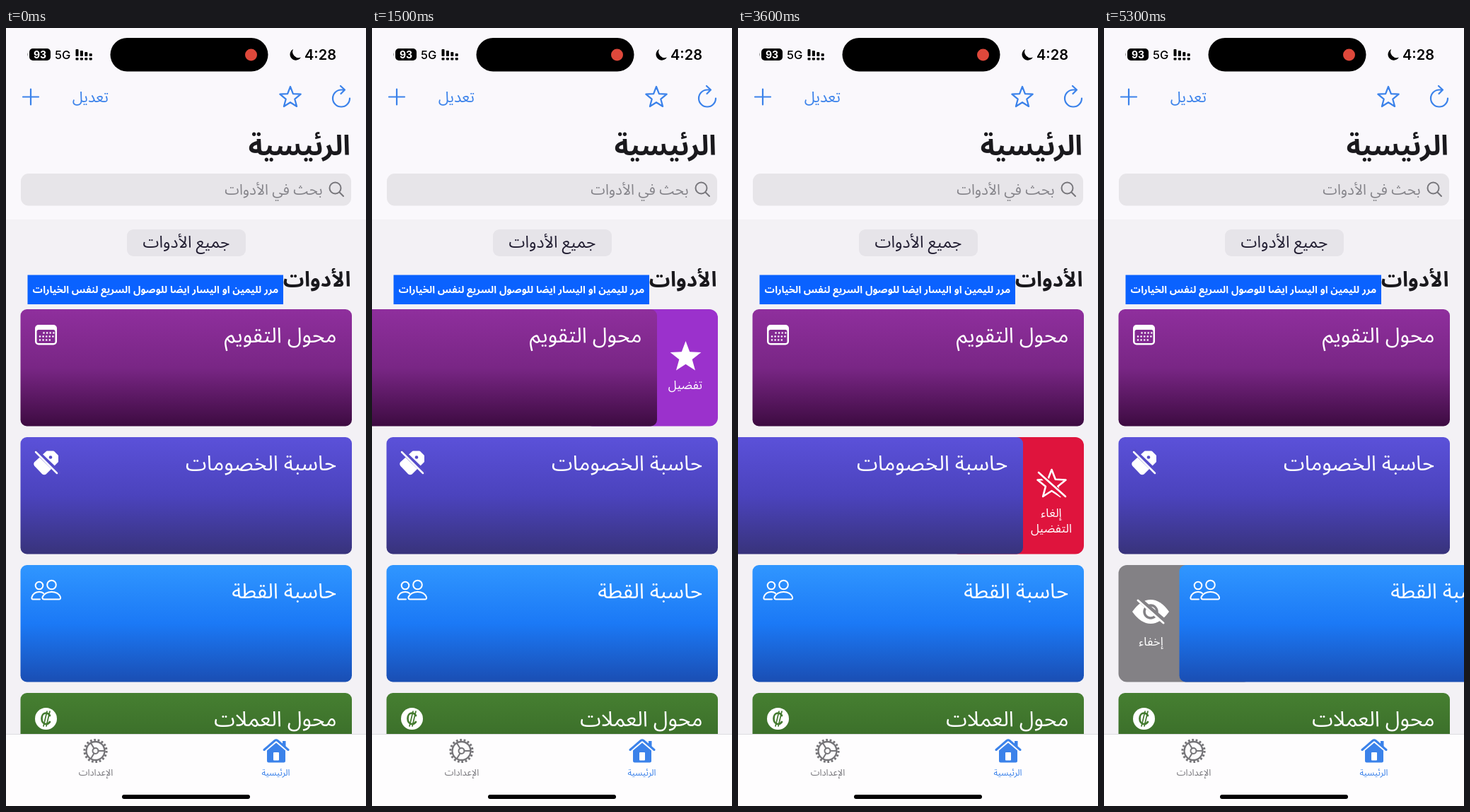
Write an HTML page that moves like this. It is 509 by 1101 pixels and loops after 5.4 s.

```html
<!DOCTYPE html>
<html lang="ar">
<head>
<meta charset="utf-8">
<title>الأدوات</title>
<style>
  html, body { margin: 0; width: 100%; height: 100%; overflow: hidden; background: #f3f1f5; }
  svg { display: block; width: 509px; height: 1101px; }
  text { font-family: "Noto Sans Arabic", "Noto Sans", "DejaVu Sans", sans-serif; direction: rtl; }
  .ltr { font-family: Inter, Roboto, sans-serif; direction: ltr; }
  .mid { text-anchor: middle; }
  .title { font-size: 30px; fill: #fff; }
  .label { font-size: 17px; fill: #fff; text-anchor: middle; }
  .line { fill: none; stroke-linecap: round; stroke-linejoin: round; }
</style>
</head>
<body>
<svg viewBox="0 0 509 1101">
  <defs id="defs"></defs>
  <rect width="509" height="271" fill="#faf8fc"/>

  <!-- status bar -->
  <rect x="33" y="29" width="30" height="17" rx="5"/>
  <path d="M31 35q-2 2.500 0 5z" fill="#999"/>
  <text class="ltr mid" x="48" y="43" font-size="14" font-weight="700" fill="#fff">93</text>
  <text class="ltr" x="69" y="44" font-size="16.500" font-weight="500">5G</text>
  <g id="signal"></g>
  <rect x="147.500" y="14" width="223" height="47.500" rx="23.700"/>
  <circle cx="346.500" cy="38" r="8.500" fill="#de483b"/>
  <path d="M406 30a8.300 8.300 0 1 0 11 11.500a8.600 8.600 0 0 1 -11 -11.500z"/>
  <text class="ltr" x="422" y="45" font-size="20" font-weight="600">4:28</text>

  <!-- toolbar -->
  <g class="line" stroke="#3b82ea" stroke-width="2.200">
    <path d="M24 97.500H46M35 86.500V108.500"/>
    <path id="starOutline"/>
    <path d="M478 87.500H474A12 12 0 1 0 486 99.500M473 82l6 5.500l-5.500 5.500"/>
  </g>
  <text x="145" y="105" font-size="21.500" fill="#3b82ea">تعديل</text>
  <text x="487" y="180" font-size="39" font-weight="700" fill="#1a191d">الرئيسية</text>
  <rect x="21" y="206" width="467" height="45.500" rx="11" fill="#e7e5e9"/>
  <path class="line" d="M457.500 226.500a8 8 0 1 0 16 0a8 8 0 1 0 -16 0M471.500 232.500l5.500 5.500" stroke="#77767b" stroke-width="2"/>
  <text x="447.500" y="236" font-size="20.700" fill="#85848a">بحث في الأدوات</text>

  <!-- list heading -->
  <rect x="171" y="285" width="168" height="38" rx="9" fill="#e6e4e9"/>
  <text class="mid" x="255" y="311" font-size="23.200" fill="#211d31">جميع الأدوات</text>
  <text x="487.500" y="366" font-size="29.500" font-weight="600" fill="#19181c">الأدوات</text>
  <rect x="30.500" y="349.500" width="361.500" height="41.500" fill="#0a62ff"/>
  <text class="mid" x="211.500" y="375" font-size="14.200" font-weight="700" fill="#fff">مرر لليمين او اليسار ايضا للوصول السريع لنفس الخيارات</text>

  <!-- swipe actions -->
  <g id="action0">
    <rect x="300" y="398" width="189" height="165.500" rx="12" fill="#9b31cc"/>
    <path id="starFull" fill="#fff"/>
    <text class="label" x="443" y="511">تفضيل</text>
  </g>
  <g id="action1">
    <rect x="300" y="579" width="189" height="165.500" rx="12" fill="#df143d"/>
    <g class="line" stroke="#fff" stroke-width="2.600">
      <path id="starOff"/>
      <path d="M426 630L462 664" stroke="#df143d" stroke-width="7"/>
      <path d="M425 629L463 663"/>
    </g>
    <text class="label" x="443" y="692">إلغاء</text>
    <text class="label" x="443" y="714">التفضيل</text>
  </g>
  <g id="action2">
    <rect x="20.500" y="760" width="189" height="165.500" rx="12" fill="#838185"/>
    <path d="M40 826Q52 809 66 809T92 826Q80 843 66 843T40 826z" fill="#fff"/>
    <circle class="line" cx="66" cy="826" r="9" stroke="#838185" stroke-width="3.500"/>
    <path class="line" d="M50 809L87 841" stroke="#838185" stroke-width="7"/>
    <path class="line" d="M48 810L84 842" stroke="#fff" stroke-width="3"/>
    <text class="label" x="66.500" y="874">إخفاء</text>
  </g>

  <!-- cards -->
  <g id="card0">
    <rect x="20.500" y="398" width="468.500" height="165.500" rx="9" fill="url(#g0)"/>
    <text class="title" x="467.500" y="445">محول التقويم</text>
    <rect x="41" y="420" width="31" height="28.500" rx="5" fill="#fff"/>
    <rect x="43.500" y="427" width="26" height="19" rx="2.500" fill="#832a92"/>
    <path class="line" d="M53.500 431.500h14M48 436.500h20M48 441.500h14" stroke="#fff" stroke-width="2.600" stroke-dasharray="0 4.600"/>
  </g>
  <g id="card1">
    <rect x="20.500" y="579" width="468.500" height="165.500" rx="9" fill="url(#g1)"/>
    <text class="title" x="467.500" y="626">حاسبة الخصومات</text>
    <path class="line" d="M58 600h9l5.500 5.500v8L56 630q-2 1.500-4 0L41.500 619q-1.500-2 0-4z" stroke="#fff" stroke-width="3" style="fill:#fff"/>
    <circle cx="63" cy="607.500" r="2.300" fill="#554cca"/>
    <path class="line" d="M43 599L74 629" stroke="#554cca" stroke-width="6.500"/>
    <path class="line" d="M42 600L72 630" stroke="#fff" stroke-width="2.500"/>
  </g>
  <g id="card2">
    <rect x="20.500" y="760" width="468.500" height="165.500" rx="9" fill="url(#g2)"/>
    <text class="title" x="467.500" y="807">حاسبة القطة</text>
    <g class="line" stroke="#fff" stroke-width="2">
      <circle cx="47" cy="789" r="5.300"/>
      <circle cx="64.500" cy="788" r="6.300"/>
      <path d="M48 808.500H38q-2 0-1.500-3Q39 798 47 798q4 0 6 2"/>
      <path d="M54 808.500H75q2.500 0 2-3Q74 798 64.500 798T51.500 805.500q-.5 3 2.500 3z"/>
    </g>
  </g>
  <g>
    <rect x="20.500" y="941" width="468.500" height="165.500" rx="9" fill="url(#g3)"/>
    <text class="title" x="467.500" y="988">محول العملات</text>
    <circle cx="56.500" cy="977.500" r="15.500" fill="#fff"/>
    <path class="line" d="M62 973q-2-3.500-5.500-3.500c-8 0-8 15.500 0 15.500q3.500 0 5.500-3" stroke="#437a2f" stroke-width="2.700"/>
    <path class="line" d="M58 967l-5 21M62 967l-5 21" stroke="#437a2f" stroke-width="1.700"/>
  </g>

  <!-- tab bar -->
  <rect y="999" width="509" height="102" fill="#fefdfe"/>
  <rect y="999" width="509" height="1" fill="#dddce0"/>
  <g class="line" stroke="#757478">
    <circle cx="126.500" cy="1023" r="13" stroke-width="2.300"/>
    <circle cx="126.500" cy="1023" r="15.500" stroke-width="3.200" stroke-dasharray="2.700 2.710" stroke-linecap="butt"/>
    <circle cx="126.500" cy="1023" r="4" stroke-width="2"/>
    <path d="M130.500 1023H139M124.500 1019.500L120 1012M124.500 1026.500L120 1034" stroke-width="2"/>
  </g>
  <g fill="#3b82ea">
    <path class="line" d="M365 1021.500L380 1008.500q2-1.500 4 0L399 1021.500" stroke="#3b82ea" stroke-width="3"/>
    <path d="M391 1009h4.500v9l-4.500-4z"/>
    <path d="M369 1022.500L382 1011.500L395 1022.500V1037q0 2.500-2.500 2.500h-21q-2.500 0-2.500-2.500z"/>
    <rect x="378" y="1025" width="8" height="11.500" rx="1" fill="#fff"/>
  </g>
  <text class="mid" x="127" y="1058" font-size="12.800" fill="#77767b">الإعدادات</text>
  <text class="mid" x="381.500" y="1058" font-size="12.500" fill="#3b82ea">الرئيسية</text>
  <rect x="164" y="1085" width="181" height="6" rx="3"/>
</svg>
<script>
const el = id => document.getElementById(id);

const shades = [
  ['#8f2f9d', '#792685', '#3d0b41'],
  ['#5b51d9', '#4b43bd', '#38337b'],
  ['#3096ff', '#1b79f6', '#1a4eb3'],
  ['#467f31', '#386a28', '#1e3c14']
];
el('defs').innerHTML = shades.map((colors, i) =>
  `<linearGradient id="g${i}" x2="0" y2="1">` +
  colors.map((c, k) => `<stop offset="${k / 2}" stop-color="${c}"/>`).join('') +
  '</linearGradient>').join('');

// Right-to-left signal: tallest bar on the left
el('signal').innerHTML = [0, 1, 2, 3].map(i => {
  const x = 98.5 + i * 6.4, h = 10 - i * 2;
  return `<rect x="${x}" y="${40 - h}" width="4" height="${h}" rx="1"/>` +
    `<rect x="${x}" y="42" width="4" height="3.500" rx="1"/>`;
}).join('');

function star(id, cx, cy, r, inner) {
  const points = Array.from({ length: 10 }, (_, i) => {
    const a = (i / 5 - 0.5) * Math.PI, d = i % 2 ? r * inner : r;
    return `${(cx + d * Math.cos(a)).toFixed(1)} ${(cy + d * Math.sin(a)).toFixed(1)}`;
  });
  el(id).setAttribute('d', `M${points.join('L')}z`);
}
star('starOutline', 402, 98.5, 15.5, 0.43);
star('starFull', 443.5, 466, 23, 0.42);
star('starOff', 443.5, 646, 21, 0.43);

const LOOP = 5400, STEP = 100, REACH = 86;
// Smooth 0 to 1 progress
const ease = (t, start, span) => {
  const p = Math.min(1, Math.max(0, (t - start) / span));
  return p * p * (3 - 2 * p);
};
const swipe = (t, open, close) => REACH * (ease(t, open, 450) - ease(t, close, 340));

function draw(now) {
  const t = Math.floor(now % LOOP / STEP) * STEP;
  const shifts = [-swipe(t, 50, 2110), -swipe(t, 1850, 3925), swipe(t, 3700, LOOP)];
  shifts.forEach((x, i) => {
    el('card' + i).setAttribute('transform', `translate(${x.toFixed(2)} 0)`);
    el('action' + i).style.display = Math.abs(x) > 0.01 ? '' : 'none';
  });
}

const begin = performance.now();
function tick() {
  draw(performance.now() - begin);
  requestAnimationFrame(tick);
}
tick();
</script>
</body>
</html>
```
